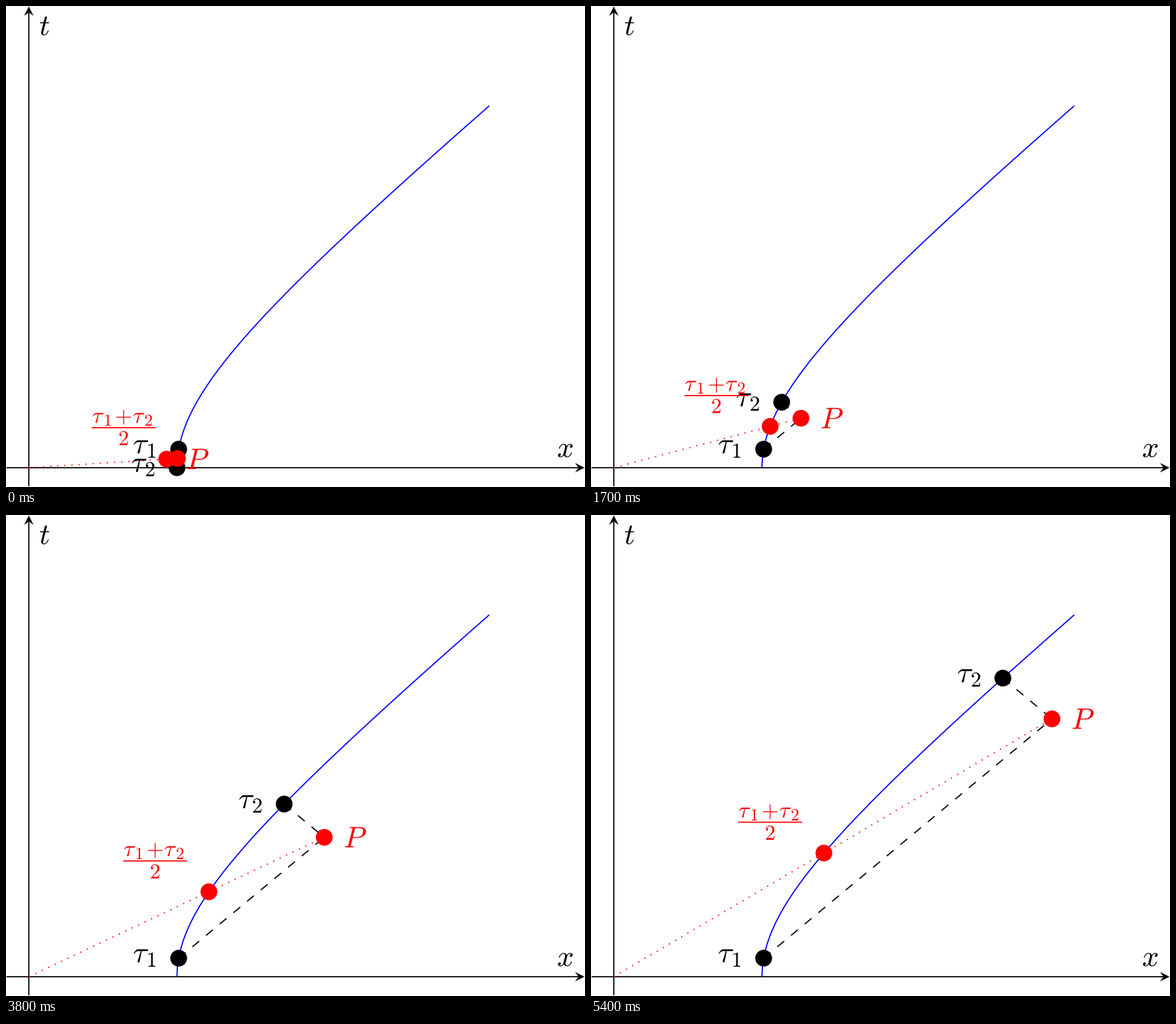
Recreate the animation shown at these times as a matplotlib script. Size 811 by 674 pixels, loop 5.5 s.

```python
import numpy as np
import matplotlib.pyplot as plt
from matplotlib.animation import FuncAnimation
from matplotlib.patches import Circle, PathPatch, Polygon
from matplotlib.path import Path
from matplotlib.textpath import TextPath
from matplotlib.transforms import Affine2D

plt.rcParams["mathtext.fontset"] = "cm"

W, H, DPI = 811, 674, 64
PX = 72 / DPI                  # points per pixel
PT = 300 / 72.27               # pixels per TeX point
EM = 10 * PT
LINE = 0.4 * PT
RADIUS = 2 * np.sqrt(2) * PT
GAP = 3.533 * PT               # padding around a label
SIDE = RADIUS + 0.2 * PT + GAP
ORIGIN = np.array([31.96, 27.05])
SCALE = np.array([207.555, 172.35])
LOW, HIGH = -0.15, 3.75
TAU1, STEP, FRAMES = 0.15, 0.03, 55

fig = plt.figure(figsize=(W / DPI, H / DPI), dpi=DPI, facecolor="white")
ax = fig.add_axes([0, 0, 1, 1])
ax.set_xlim(0, W)
ax.set_ylim(0, H)
ax.axis("off")


def to_px(x, t):
    return ORIGIN + SCALE * np.array([x, t])


def on_curve(tau):
    return to_px(np.cosh(tau), np.sinh(tau))


def glyph(tex, x=0, y=0, size=1.0):
    """Outline of a formula; position and size in em."""
    return TextPath((x * EM, y * EM), f"${tex}$", size=size * EM)


def label(parts, color, z):
    path = Path.make_compound_path(*parts)
    return ax.add_patch(PathPatch(path, fc=color, lw=0, zorder=z))


def place(patch, x, y):
    patch.set_transform(Affine2D().translate(x, y) + ax.transData)


def line(color, z, xs=(), ys=(), style="-"):
    return ax.plot(xs, ys, color=color, lw=LINE * PX, ls=style, zorder=z,
                   dash_capstyle="butt", solid_capstyle="butt", snap=False)[0]


def dot(color, z):
    return ax.add_patch(Circle((0, 0), RADIUS, fc=color, lw=0, zorder=z))


def axis(start, end):
    """Straight axis with a stealth arrow tip at its end."""
    u = (end - start) / np.hypot(*(end - start))
    n = np.array([-u[1], u[0]])
    d = 0.4 * PT
    line("black", 3, *zip(start, end - 5 * d * u))
    tip = [end, end - 8 * d * u + 4 * d * n, end - 5 * d * u,
           end - 8 * d * u - 4 * d * n]
    ax.add_patch(Polygon(tip, fc="black", lw=0, zorder=3))


def tau_label(digit, z):
    return label([glyph(r"\tau"), glyph(digit, 0.456, -0.15, 0.72)], "black", z)


def mean_label(z):
    """Fraction (tau1 + tau2) / 2 with the left end of its bar at 0, 0."""
    width, up, down = 2.156, 0.16, -0.595
    bar = Path.unit_rectangle().transformed(
        Affine2D().scale(width * EM, LINE).translate(0, -LINE / 2))
    parts = [bar, glyph("+", 0.785, up, 0.75),
             glyph("2", width / 2 - 0.18, down, 0.72)]
    for x, digit in ((0.01, "1"), (1.385, "2")):
        parts += [glyph(r"\tau", x, up, 0.76),
                  glyph(digit, x + 0.39, up - 0.1, 0.57)]
    return label(parts, "red", z)


# Static scene
line("blue", 2, *on_curve_pts) if False else None
curve = np.array([on_curve(s) for s in np.linspace(0, 1.8, 200)])
line("blue", 2, curve[:, 0], curve[:, 1])
axis(to_px(LOW, 0), to_px(HIGH, 0))
axis(to_px(0, LOW), to_px(0, HIGH))
place(label([glyph("x")], "black", 3),
      to_px(HIGH, 0)[0] - GAP - 0.5715 * EM, ORIGIN[1] + GAP)
place(label([glyph("t")], "black", 3),
      ORIGIN[0] + GAP, to_px(0, HIGH)[1] - GAP - 0.615 * EM)

# Moving parts
rays = [line("black", 4, style=(0, (7.5, 7.5))) for _ in range(2)]
radial = line("red", 4, style=(0, (1, 5)))
dots = [dot("black", 5), dot("black", 5), dot("red", 6), dot("red", 6)]
tau_labels = [tau_label("1", 7), tau_label("2", 7)]
mean = mean_label(8)
event = label([glyph("P")], "red", 8)


def update(i):
    tau2 = STEP * i
    first, second = on_curve(TAU1), on_curve(tau2)
    middle = on_curve((TAU1 + tau2) / 2)
    # The event lies where the two light rays cross
    v, u = np.exp(tau2), np.exp(-TAU1)
    p = to_px((v + u) / 2, (v - u) / 2)

    for ray, start in zip(rays, (first, second)):
        ray.set_data(*zip(start, p))
    radial.set_data(*zip(ORIGIN, p))
    for d, pos in zip(dots, (first, second, middle, p)):
        d.center = tuple(pos)
    for text, pos in zip(tau_labels, (first, second)):
        place(text, pos[0] - SIDE - 0.886 * EM, pos[1] - 0.14 * EM)
    place(mean, middle[0] - 120, middle[1] + 43.2)
    place(event, p[0] + SIDE, p[1] - 0.342 * EM)
    return []


anim = FuncAnimation(fig, update, frames=FRAMES, interval=100,
                     repeat=True, repeat_delay=0, blit=False)
plt.show()
```
